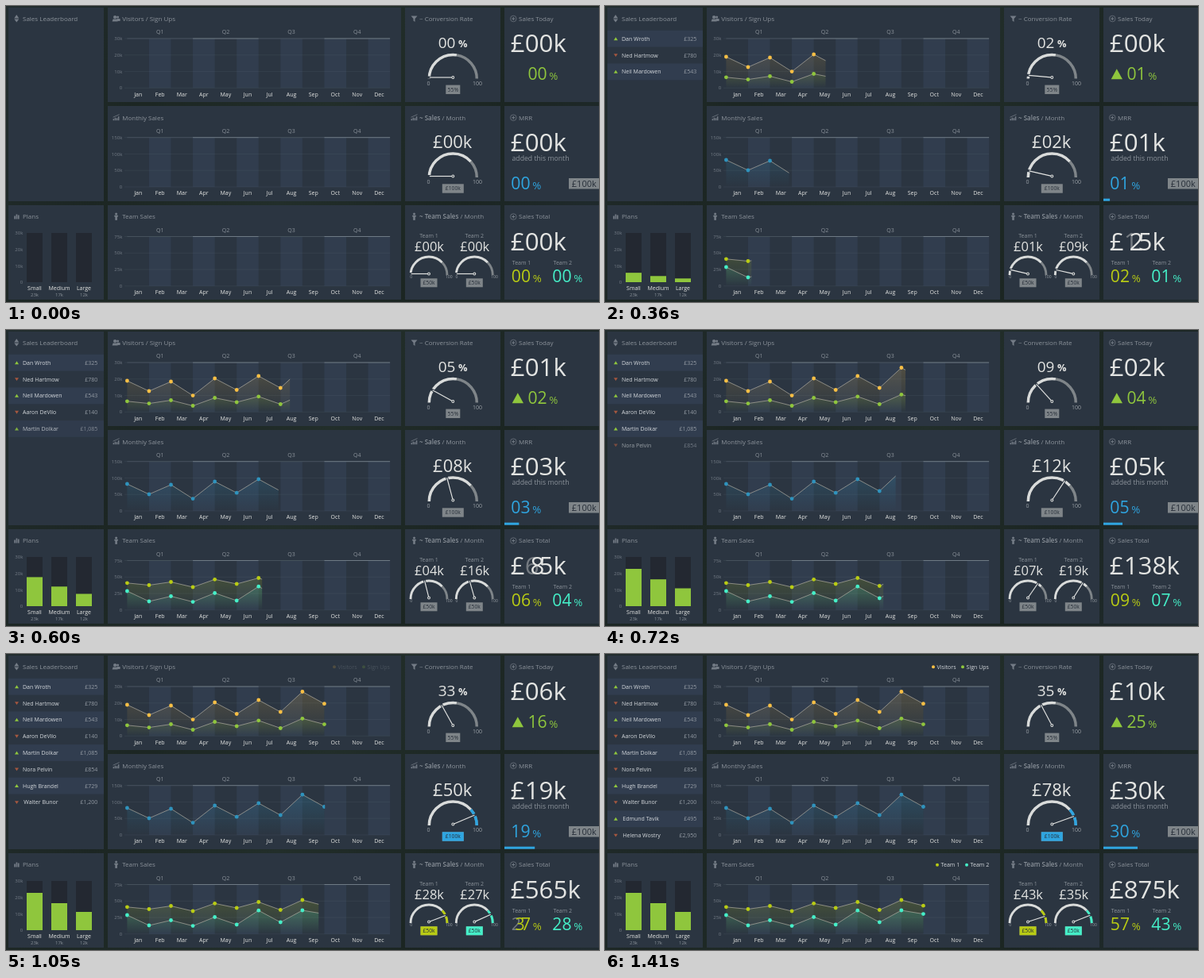
Animation of 746 by 373 pixels, one loop 1.92 s. Source, as an HTML page with a canvas:

```html
<!DOCTYPE html>
<html lang="en">
<head>
<meta charset="utf-8">
<title>Sales dashboard</title>
<style>
html, body { margin: 0; width: 100%; height: 100%; overflow: hidden; background: #1f292b; }
canvas { display: block; width: 746px; height: 373px; }
</style>
</head>
<body>
<canvas id="stage"></canvas>
<script>
const W = 746, H = 373, LOOP = 1920, STEP = 30, LAST = 1410;
const canvas = document.getElementById('stage');
const c = canvas.getContext('2d');
const dpr = window.devicePixelRatio || 1;
canvas.width = W * dpr;
canvas.height = H * dpr;

const PANEL = '#2b3541', TITLE = '#8b929a', DIM = '#747c86', WHITE = '#e3e4e2', SOFT = '#d5d9dd';
const YELLOW = '#f8bf45', GREEN = '#8fc63d', BLUE = '#2fa5e0', SKY = '#2f93bd';
const OLIVE = '#b9cc14', MINT = '#45efc8', BOX = '#7f8589';
const ROWS = [0, 124.7, 249.5];

const clamp = (v) => Math.max(0, Math.min(1, v));
const ramp = (t, from, to) => clamp((t - from) / (to - from));

// Smooth monotone curve through [time, value] points
function curve(...p) {
  const d = p.slice(1).map((q, i) => (q[1] - p[i][1]) / (q[0] - p[i][0]));
  const m = p.map((_, i) => {
    const a = d[i - 1], b = d[i];
    return a > 0 && b > 0 ? 2 * a * b / (a + b) : 0;
  });
  return (t) => {
    if (t <= p[0][0]) return p[0][1];
    const i = p.findIndex((q) => q[0] >= t) - 1;
    if (i < 0) return p[p.length - 1][1];
    const h = p[i + 1][0] - p[i][0], u = (t - p[i][0]) / h, v = 1 - u;
    return v * v * (1 + 2 * u) * p[i][1] + u * u * (3 - 2 * u) * p[i + 1][1]
      + h * u * v * (v * m[i] - u * m[i + 1]);
  };
}

const growth = curve([60, 0], [240, .0117], [480, .056], [720, .158], [930, .353], [1170, .9017], [1410, 1]);
const swing = curve([0, 0], [240, .03], [480, .18], [720, .77], [930, .94], [1170, 1]);
const reveal = curve([110, 149], [165, 162], [240, 206.5], [320, 253], [405, 303], [480, 334], [560, 349],
  [645, 366], [720, 378], [770, 382], [855, 390], [930, 396], [1010, 404]);
const barRise = curve([110, 0], [240, .1], [480, .45], [720, 1]);
const progress = curve([60, 0], [240, 4], [480, 13], [720, 24], [930, 34], [1170, 41], [1410, 43]);
const steady = curve([0, 0], [240, 6], [480, 12], [720, 19], [930, 24], [1170, 30], [1410, 35]);

const grow = (max) => (t) => Math.round(max * growth(t));
const pad = (n) => String(n).padStart(2, '0');

function rect(x, y, w, h, fill) {
  c.fillStyle = fill;
  c.fillRect(x, y, w, h);
}

function dot(x, y, r, fill) {
  c.fillStyle = fill;
  c.beginPath();
  c.arc(x, y, r, 0, 7);
  c.fill();
}

function poly(fill, ...xy) {
  c.fillStyle = fill;
  c.beginPath();
  for (let i = 0; i < xy.length; i += 2) c.lineTo(xy[i], xy[i + 1]);
  c.fill();
}

function line(x1, y1, x2, y2, color, width = 1) {
  c.strokeStyle = color;
  c.lineWidth = width;
  c.beginPath();
  c.moveTo(x1, y1);
  c.lineTo(x2, y2);
  c.stroke();
}

// y is the middle of the capitals
function text(s, x, y, size, fill, align = 'left', weight = 400) {
  c.font = `${weight} ${size}px "Open Sans", sans-serif`;
  c.textAlign = align;
  c.fillStyle = fill;
  c.fillText(s, x, y + size * .357);
  return c.measureText(s).width;
}

function fade(alpha, draw) {
  if (alpha <= 0) return;
  c.save();
  c.globalAlpha *= alpha;
  draw();
  c.restore();
}

const icons = {
  sort(x, y) {
    poly(DIM, x - 3, y - .6, x, y - 5, x + 3, y - .6);
    poly(DIM, x - 3, y + .4, x, y + 4.6, x + 3, y + .4);
  },
  people(x, y) {
    dot(x + 2, y - 2, 1.6, DIM);
    rect(x + 1, y, 4, 3, DIM);
    dot(x - 1.5, y - 2, 2.1, DIM);
    poly(DIM, x - 5, y + 3.5, x - 4, y + .6, x + 1, y + .6, x + 2, y + 3.5);
  },
  chart(x, y) {
    [2, 3.5, 3, 5].forEach((h, i) => rect(x - 4 + i * 2.1, y + 3.5 - h, 1.5, h, DIM));
    line(x - 4, y - .5, x + 4, y - 4, DIM, .8);
  },
  person(x, y) {
    dot(x, y - 3.4, 1.5, DIM);
    rect(x - 2.4, y - 1.6, 4.8, 1.6, DIM);
    rect(x - 1.3, y - 1.6, 2.6, 6, DIM);
  },
  bars(x, y) {
    [4, 6, 5].forEach((h, i) => rect(x - 3 + i * 2.3, y + 3 - h, 1.7, h, DIM));
  },
  funnel(x, y) {
    poly(DIM, x - 4, y - 3.5, x + 4, y - 3.5, x + 1, y, x + 1, y + 4, x - 1, y + 2.6, x - 1, y);
  },
  plus(x, y) {
    c.strokeStyle = DIM;
    c.lineWidth = .7;
    c.beginPath();
    c.arc(x, y, 3.8, 0, 7);
    c.stroke();
    line(x - 2, y, x + 2, y, DIM);
    line(x, y - 2, x, y + 2, DIM);
  }
};

function head(icon, x, left, row, title, rest = '') {
  const y = 16 + ROWS[row];
  icons[icon](x, y);
  const w = text(title, left, y, 8, TITLE, 'left', rest ? 600 : 400);
  if (rest) text(rest, left + w, y, 8, TITLE);
}

function backdrop() {
  const g = c.createLinearGradient(0, 0, W, H);
  ['#222d2e', '#1c2623', '#222e2a', '#1b2522', '#212c30'].forEach((k, i) => g.addColorStop(i / 4, k));
  rect(0, 0, W, H, g);
  const tops = [2, 126, 251], heights = [119, 120, 119];
  for (const [x, w] of [[128, 369], [502, 120], [627, 119]])
    tops.forEach((y, i) => rect(x, y, w, heights[i], PANEL));
  rect(3, 2, 120, 244, PANEL);
  rect(3, 251, 120, 119, PANEL);
}

const people = [
  ['Dan Wroth', '£325'], ['Ned Hartmow', '£780'], ['Neil Mardowen', '£543'], ['Aaron DeVilo', '£140'],
  ['Martin Dolkar', '£1,085'], ['Nora Pelvin', '£854'], ['Hugh Brandel', '£729'], ['Walter Bunor', '£1,200'],
  ['Edmund Tavik', '£495'], ['Helena Wostry', '£2,950']
];

function leaderboard(t) {
  head('sort', 13.3, 21, 0, 'Sales Leaderboard');
  people.forEach(([name, sum], i) => {
    const y = 41.2 + i * 20.82, start = Math.max(20, 230 + (i - 2) * 138);
    fade(ramp(t, start, start + 115), () => {
      if (i % 2) poly('#a5573f', 11, y - 1.8, 16, y - 1.8, 13.5, y + 2);
      else {
        rect(3, y - 10.4, 120, 20.8, '#313d4f');
        poly(GREEN, 11, y + 2, 16, y + 2, 13.5, y - 2);
      }
      text(name, i < 7 ? 21 : 22.3, y, 7, SOFT);
      text(sum, 115.3, y, 7, '#949ba4', 'right');
    });
  });
}

function plans(t) {
  head('bars', 13.3, 21, 2, 'Plans');
  ['30k', '20k', '10k', '0'].forEach((s, i) => text(s, 21.3, 285.8 + i * 20.8, 6, DIM, 'right'));
  [['Small', '23k', 47], ['Medium', '17k', 34], ['Large', '12k', 23]].forEach(([name, count, h], i) => {
    const x = 26 + i * 31, top = h * barRise(t - i * 17);
    rect(x, 286, 20, 62, '#232831');
    rect(x, 348 - top, 20, top, GREEN);
    text(name, x + 10, 355.3, 7, WHITE, 'center');
    text(count, x + 10, 363.6, 6, TITLE, 'center');
  });
}

const X0 = 152.4, MONTH = 27.56;
const months = 'Jan Feb Mar Apr May Jun Jul Aug Sep Oct Nov Dec'.split(' ');

const charts = [
  { icon: 'people', title: 'Visitors / Sign Ups', labels: ['30k', '20k', '10k', '0'], legend: [1030, 1140],
    series: [
      { name: 'Visitors', color: YELLOW, lx: 413, ys: [64, 77, 65, 82.6, 61, 75.5, 58, 73, 47.5, 62.7] },
      { name: 'Sign Ups', color: GREEN, lx: 450, ys: [89.8, 92.6, 88.5, 95.5, 85.5, 91, 83.8, 93.5, 81.3, 88.6] }
    ] },
  { icon: 'chart', title: 'Monthly Sales', labels: ['150k', '100k', '50k', '0'],
    series: [{ color: SKY, ys: [194, 207, 195, 212.6, 191, 205.2, 188, 203, 177.2, 192.5] }] },
  { icon: 'person', title: 'Team Sales', labels: ['75k', '50k', '25k', '0'], legend: [1150, 1270],
    series: [
      { name: 'Team 1', color: OLIVE, lx: 418, ys: [318.8, 321.5, 317.5, 324, 314.3, 320, 312.5, 322.5, 310, 317.2] },
      { name: 'Team 2', color: MINT, lx: 455, ys: [329, 342, 335.5, 342.6, 331.5, 341, 323.2, 338, 323, 327.6] }
    ] }
];

function chart(def, row, t) {
  const dy = ROWS[row], top = 41 + dy, base = 103.3 + dy;
  head(def.icon, 138.6, 146.2, row, def.title);
  months.forEach((m, i) => {
    const x = X0 + i * MONTH;
    if (i % 2) rect(x, top, MONTH, base - top, '#313d4e');
    text(m, x + MONTH / 2, 111.3 + dy, 7, WHITE, 'center');
  });
  def.labels.forEach((s, i) => {
    const y = top + i * 20.77;
    text(s, 146.3, y, 6, DIM, 'right');
    line(149, y, 483, y, 'rgba(130,145,160,.13)', .8);
  });
  for (let q = 0; q < 4; q++) {
    const x = X0 + q * 3 * MONTH;
    line(x, top, x + 3 * MONTH, top, q % 2 ? '#77828c' : '#48545e', .9);
    text('Q' + (q + 1), x + 1.5 * MONTH, 33 + dy, 7, TITLE, 'center');
  }

  c.save();
  c.beginPath();
  c.rect(148, top - 5, reveal(t - row * 77) - 148, base - top + 6);
  c.clip();
  for (const s of def.series) {
    const path = new Path2D();
    s.ys.forEach((y, i) => path.lineTo(X0 + i * MONTH, y));
    const area = new Path2D(path);
    area.lineTo(X0 + 9 * MONTH, base);
    area.lineTo(X0, base);
    const g = c.createLinearGradient(0, Math.min(...s.ys), 0, base);
    g.addColorStop(0, s.color);
    g.addColorStop(1, s.color + '00');
    fade(s.color === SKY ? .24 : .18, () => {
      c.fillStyle = g;
      c.fill(area);
    });
    c.strokeStyle = 'rgba(185,180,168,.72)';
    c.lineWidth = .9;
    c.stroke(path);
    s.ys.forEach((y, i) => dot(X0 + i * MONTH, y, 2.4, s.color));
  }
  c.restore();

  if (def.legend) fade(ramp(t, ...def.legend), () => def.series.forEach((s) => {
    dot(s.lx, 16.2 + dy, 2, s.color);
    text(s.name, s.lx + 4.6, 16.2 + dy, 7, SOFT);
  }));
}

function tag(s, x, y, w, h, fill) {
  rect(x - w / 2, y - h / 2, w, h, fill);
  text(s, x, y, 6.8, '#272f39', 'center');
}

function gauge(t, { x, y, r, goal, end, label, tagY, tagW, lit }) {
  const small = r < 28, tagH = small ? 11 : 11.4;
  const arc = (from, to, color) => {
    c.strokeStyle = color;
    c.lineWidth = small ? 2.9 : 3.5;
    c.beginPath();
    c.arc(x, y + 1.5, r, Math.PI * (1 + from), Math.PI * (1 + to));
    c.stroke();
  };
  const glow = lit ? ramp(t, 790, 960) : 0;
  arc(0, goal, '#d9dbda');
  arc(goal, 1, BOX);
  fade(glow, () => arc(goal, 1, lit));

  const a = Math.PI * (1 + end * swing(t)), cos = Math.cos(a), sin = Math.sin(a);
  const at = (k) => [x + cos * k, y + sin * k];
  line(...at(r - 4), ...at(r + 3), PANEL, 3);
  line(...at(1.5), ...at(r - .5), WHITE, 1.15);
  dot(x, y, 1.9, WHITE);
  dot(x, y, .9, PANEL);

  const ly = y + (small ? 4.2 : 7.3), size = small ? 5 : 7;
  text('0', x - r - (small ? -.6 : .8), ly, size, '#9aa0a6', 'center');
  text('100', x + r + (small ? 2.2 : .8), ly, size, '#9aa0a6', 'center');
  tag(label, x, tagY, tagW, tagH, BOX);
  fade(glow, () => tag(label, x, tagY, tagW, tagH, lit));
}

function gauges(t) {
  head('funnel', 513.5, 520, 0, '~ Conversion Rate');
  head('chart', 513.5, 520, 1, '~ Sales', ' / Month');
  head('person', 513.5, 520, 2, '~ Team Sales', ' / Month');

  text(pad(grow(35)(t * 1.19)), 543.7, 46, 19, WHITE);
  text('%', 569, 47.6, 12.8, WHITE, 'left', 700);
  gauge(t, { x: 562.3, y: 90, r: 30, goal: .55, end: .345, label: '55%', tagY: 105.3, tagW: 18 });

  text(`£${pad(grow(78)(t))}k`, 561.7, 170.8, 22, WHITE, 'center');
  gauge(t, { x: 562.3, y: 214.5, r: 30, goal: .77, end: .89, label: '£100k', tagY: 230, tagW: 27, lit: BLUE });

  const teams = [[532, grow(43), .9, OLIVE], [589.3, (k) => Math.round(steady(k)), .88, MINT]];
  teams.forEach(([x, value, end, lit], i) => {
    text('Team ' + (i + 1), x, 290, 7, TITLE, 'center');
    text(`£${pad(value(t))}k`, x + .5, 303.6, 16.5, WHITE, 'center');
    gauge(t, { x, y: 337.5, r: 23, goal: .76, end, label: '£50k', tagY: 348.8, tagW: 21, lit });
  });
}

// A new tens digit slides in from the right while the old one fades
function counter(t, max, x, y, size, fill, unit) {
  const value = grow(max), now = pad(value(t)), old = pad(value(t - 45));
  const money = unit === 'k';
  if (money) x += text('£', x, y, size, fill);
  const changing = now.length === 2 && now[0] !== old[0];
  if (changing) fade(.4, () => text(old[0], x, y, size, WHITE));
  x += text(now[0], x + (changing ? size * .22 : 0), y, size, fill);
  x += text(now.slice(1) + (money ? unit : ''), x, y, size, fill);
  if (!money) text(unit, x + 2.6, y + 2.9, 13.4, fill);
}

function totals(t) {
  const money = (max, y) => counter(t, max, 634.8, y, 31.3, WHITE, 'k');
  const percent = (max, x, y, fill) => counter(t, max, x, y, 21.2, fill, '%');
  ['Sales Today', 'MRR', 'Sales Total'].forEach((s, i) => head('plus', 638.3, 645.1, i, s));

  money(10, 47);
  fade(ramp(t, 60, 180), () => poly(GREEN, 636.7, 92.3, 651, 92.3, 643.8, 79.3));
  percent(25, 656.5, 85.5, GREEN);

  money(30, 172);
  text('added this month', 636.5, 191.5, 8.7, TITLE);
  percent(30, 635.3, 223.3, BLUE);
  rect(708, 217, 38, 13.5, BOX);
  text('£100k', 711.8, 223.7, 11, '#272f39');
  rect(627, 242.7, progress(t), 3, BLUE);

  money(875, 296.5);
  text('Team 1', 636.8, 323.8, 7, TITLE);
  text('Team 2', 688.5, 323.8, 7, TITLE);
  percent(57, 635.8, 340, OLIVE);
  percent(43, 687.3, 340, MINT);
}

function draw(t) {
  c.setTransform(dpr, 0, 0, dpr, 0, 0);
  backdrop();
  leaderboard(t);
  plans(t);
  charts.forEach((def, row) => chart(def, row, t));
  gauges(t);
  totals(t);
}

const start = performance.now();
function tick() {
  const t = (performance.now() - start) % LOOP;
  draw(Math.min(LAST, Math.floor(t / STEP) * STEP));
  requestAnimationFrame(tick);
}
tick();
</script>
</body>
</html>
```
